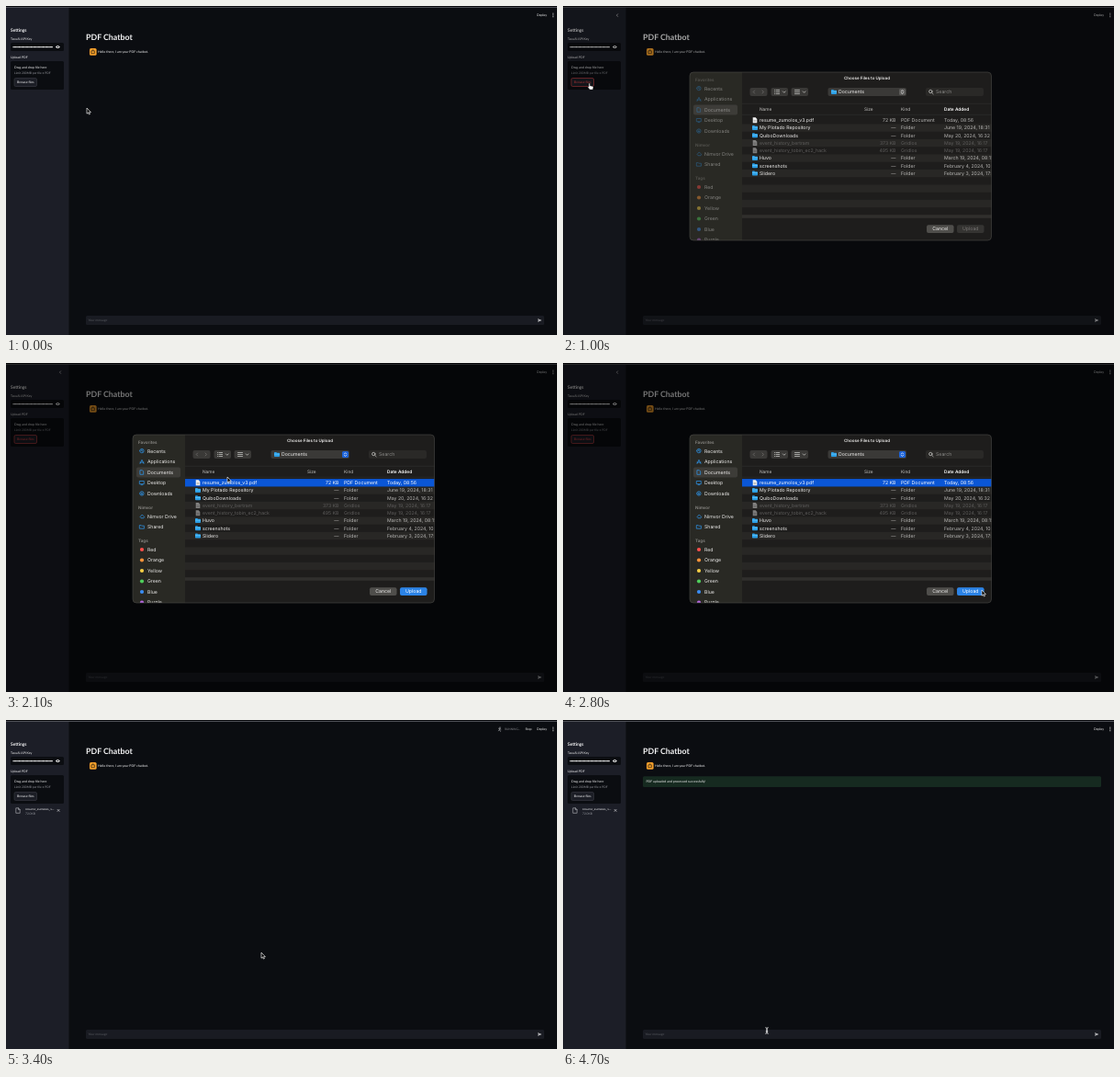
Write an HTML page that moves like this. It is 600 px wide and 358 px high and loops after 5 s.

```html
<!DOCTYPE html>
<html lang="en">
<head>
<meta charset="utf-8">
<title>PDF Chatbot</title>
<style>
html, body { margin: 0; width: 100%; height: 100%; overflow: hidden; background: #0b0d11; }
svg { display: block; width: 600px; height: 358px; }
text { fill: #f4f4f5; font: 3.5px Lato, sans-serif; text-rendering: geometricPrecision; white-space: pre; }
.b { font-weight: 700; }
.line { fill: none; stroke-width: .7; stroke-linecap: round; stroke-linejoin: round; }
#browse rect { fill: #1c1e26; stroke: #3b3d45; stroke-width: .6; }
#browse.hover rect { stroke: #e0474b; }
#browse.hover text { fill: #f0484d; }
#browse.press rect { fill: #4a343b; }
#browse.press text { fill: #a8434a; }
#dialog text { font: 5.2px Inter, sans-serif; fill: #f0efee; }
#dialog .head { font-size: 4.6px; fill: #8b8a86; font-weight: 600; }
#dialog .title { font-size: 4.5px; font-weight: 600; }
#dialog .col { font-size: 4.8px; fill: #c4c3c1; }
#dialog .sub { fill: #b9b8b6; }
#dialog .off text { fill: #5e5d5c; }
#dialog .off .icon { opacity: .45; }
#dialog .date { font-size: 5.2px; }
#pick, #go { visibility: hidden; }
.ready #pick, .ready #go { visibility: visible; }
.ready .row0 text { fill: #fff !important; }
#side { opacity: .45; }
.ready #side { opacity: 1; }
.btn { fill: #3a3937; }
#step { fill: #5b5a58; }
.ready #step { fill: #1d63d8; }
#dialog #upText { fill: #777573; }
#dialog.ready #upText { fill: #fff; }
</style>
</head>
<body>
<svg viewBox="0 0 600 358">
  <defs>
    <clipPath id="frame"><rect x="138" y="78" width="328.5" height="183" rx="4"/></clipPath>
    <clipPath id="cut"><rect x="18" y="96.3" width="40" height="5"/></clipPath>
    <g id="folder"><path fill="#2c9fe6" d="M0 .8q0-.8.8-.8h1.5l.8.8h2.1q.8 0 .8.8v2.6q0 .8-.8.8H.8q-.8 0-.8-.8z"/><path fill="#63c4f7" d="M0 1.7h6v.7H0z"/></g>
    <g id="sheet"><path fill="#f2f2f2" d="M0 0h3l1.6 1.6V6H0z"/><path stroke="#777" stroke-width=".5" d="M1 3h2.6M1 4.4h2.6"/></g>
  </defs>

  <rect width="600" height="358" fill="#0b0d11"/>
  <rect width="68.5" height="358" fill="#1c1e27"/>
  <rect width="600" height="1" fill="#08090c"/>
  <rect y="1" width="600" height=".9" fill="#55575d"/>

  <path id="fold" class="line" stroke="#d0d0d3" d="M59.6 8.8l-1.2 1.3 1.2 1.3"/>
  <text class="b" x="5" y="28.4" style="font-size:4.9px">Settings</text>
  <text x="5" y="37.4">TavuAI API Key</text>
  <rect x="5" y="40" width="58" height="9" rx="1.5" fill="#0b0d11"/>
  <path d="M7.5 44.6H51" stroke="#f0f0f0" stroke-width="1.1" stroke-dasharray="1.1 .2"/>
  <path d="M53.9 44.5q2.5-3.2 5 0q-2.5 3.2-5 0z" fill="#f0f0f0"/>
  <circle cx="56.4" cy="44.5" r=".8" fill="#0b0d11"/>
  <text x="5" y="57.3">Upload PDF</text>
  <rect x="5" y="60" width="58" height="31" rx="1.5" fill="#0b0d11"/>
  <text x="9" y="67.6">Drag and drop file here</text>
  <text x="9" y="73.5" style="font-size:3.3px;fill:#94969d">Limit 200MB per file • PDF</text>
  <g id="browse"><rect x="9" y="78.5" width="24.5" height="9" rx="1.5"/><text x="12" y="84.2">Browse files</text></g>
  <g id="file">
    <path class="line" stroke="#b9bac0" style="stroke-width:.6" d="M11.2 95.8h2.4l1.6 1.7v3.8h-4zM13.5 95.9v1.7h1.6"/>
    <text x="21" y="98.4" clip-path="url(#cut)">resume_zumolos_v…</text>
    <text x="21" y="102.9" style="font-size:3.3px;fill:#94969d">72.0KB</text>
    <path class="line" stroke="#d0d0d3" d="M56.1 97.4l2 2m0-2l-2 2"/>
  </g>

  <g id="run">
    <circle cx="538" cy="8.1" r=".7" fill="#a4a5aa"/>
    <path id="legs" class="line" stroke="#a4a5aa"/>
    <text x="543" y="11.2" style="font-size:3.2px;fill:#85868c">RUNNING...</text>
    <text x="565.5" y="11.3">Stop</text>
  </g>
  <text x="578" y="11.3">Deploy</text>
  <path d="M595.8 8.1v4" stroke="#f0f0f0" stroke-width="1" stroke-dasharray=".1 1.7" stroke-linecap="round"/>
  <text class="b" x="87" y="37.2" style="font-size:8.8px">PDF Chatbot</text>
  <rect x="91" y="46" width="7.6" height="7.8" rx="1.6" fill="#f5a02c"/>
  <path class="line" stroke="#3c2a12" d="M93.2 48.8h3.2v2.8h-3.2zM94.8 47.5v1.2"/>
  <text x="100" y="51.2" style="font-size:3.55px">Hello there, I am your PDF chatbot.</text>
  <g id="done">
    <rect x="87" y="61.3" width="499" height="11.6" rx="1.5" fill="#162a20"/>
    <text x="90.5" y="68.4" fill="#dff5e6">PDF uploaded and processed successfully!</text>
  </g>
  <rect x="87" y="337" width="499" height="10" rx="1.5" fill="#191b22"/>
  <text x="89.5" y="343.2" style="fill:#55575d">Your message</text>
  <path d="M579.2 340.2l4.2 1.8-4.2 1.8v-1.4l2-.4-2-.4z" fill="#c9cacd"/>

  <rect id="dim" width="600" height="358"/>

  <g id="dialog">
    <g clip-path="url(#frame)">
      <rect x="138" y="78" width="329" height="183" fill="#1e1d1c"/>
      <rect x="138" y="78" width="57" height="183" fill="#292924"/>
      <g id="stripes"></g>
      <path d="M195 112.3h272M195 124.3h272" stroke="#353432" stroke-width=".5"/>
      <path d="M195 235h272" stroke="#302f2d" stroke-width="3.4"/>
      <rect id="pick" x="195" y="126.1" width="272" height="8.4" fill="#0a56d6"/>
      <rect x="142" y="113.5" width="48" height="11" rx="2" fill="#3d3c38"/>
      <g id="side"></g>
      <text class="title" x="331" y="85.6" text-anchor="middle">Choose Files to Upload</text>
      <g class="btn">
        <rect x="203.5" y="95" width="19" height="9" rx="2"/><rect x="226.5" y="95" width="18.5" height="9" rx="2"/>
        <rect x="248.5" y="95" width="18.5" height="9" rx="2"/><rect x="288.5" y="95" width="85.5" height="9" rx="2"/>
        <rect x="395" y="95" width="63" height="9" rx="2" fill="#2a2927"/>
      </g>
      <path class="line" stroke="#777573" d="M208.6 98l-1.4 1.5 1.4 1.5M217 98l1.4 1.5-1.4 1.5"/>
      <path class="line" stroke="#d5d4d2" d="M230.5 97.5h.3m1.4 0h3.4M230.5 99.5h.3m1.4 0h3.4M230.5 101.5h.3m1.4 0h3.4M239.4 98.9l1.4 1.4 1.4-1.4M261.2 98.9l1.4 1.4 1.4-1.4M252.5 97.5h5M252.5 99.5h5M252.5 101.5h5"/>
      <rect id="step" x="366" y="96" width="7" height="7" rx="1.5"/>
      <path class="line" stroke="#fff" d="M368.3 98.9l1.2-1.2 1.2 1.2M368.3 100.2l1.2 1.2 1.2-1.2"/>
      <use href="#folder" x="292" y="97"/>
      <text x="300" y="101.4">Documents</text>
      <circle class="line" cx="400.3" cy="99" r="1.7" stroke="#d5d4d2"/><path class="line" stroke="#d5d4d2" d="M401.6 100.3l1.5 1.5"/>
      <text x="406" y="101.4" style="fill:#8b8a88">Search</text>
      <text class="col" x="214" y="119.8">Name</text><text class="col" x="328" y="119.8">Size</text>
      <text class="col" x="368" y="119.8">Kind</text><text class="col" x="415" y="119.8" style="fill:#fff;font-weight:600">Date Added</text>
      <g id="rows"></g>
      <rect x="396" y="244.3" width="29.5" height="8.6" rx="2" fill="#4f4e4b"/>
      <text x="410.7" y="250.4" text-anchor="middle">Cancel</text>
      <rect x="429" y="244.3" width="29.5" height="8.6" rx="2" fill="#353432"/>
      <rect id="go" x="429" y="244.3" width="29.5" height="8.6" rx="2" fill="#2b83e6"/>
      <text id="upText" x="443.7" y="250.4" text-anchor="middle">Upload</text>
    </g>
    <rect x="138" y="78" width="328.5" height="183" rx="4" fill="none" stroke="#4b4a47" stroke-width=".6"/>
  </g>

  <g id="cursor">
    <path id="arrow" fill="#000" stroke="#fff" stroke-width=".65" d="M0 0V6.2L1.5 4.9 2.4 7 3.4 6.6 2.5 4.6H4.4Z"/>
    <path id="hand" fill="#fff" stroke="#111" stroke-width=".4" d="M-.9.5q.7-.8 1.3 0v2.3l3 .6q.7.2.6 1L3.5 7H.2L-1.9 4.4q0-.9 1 -.3z"/>
    <path id="beam" class="line" stroke="#fff" d="M-1.3-3.3q1.3 0 1.3.8v5q0 .8-1.3.8M1.3-3.3q-1.3 0-1.3.8v5q0 .8 1.3.8M-.8.9h1.6"/>
  </g>
</svg>
<script>
const $ = id => document.getElementById(id);
const text = (x, y, s, cls = "") => `<text class="${cls}" x="${x}" y="${y}">${s}</text>`;

const icons = [
  "M2.2-.4v-1.2M2.2-.4l1 .6M0-.4a2.2 2.2 0 1 0 4.4 0a2.2 2.2 0 1 0-4.4 0",
  "M.3 2L2.3-2.2 4.3 2M.2.6h4.2",
  "M.6-2.3h2.1L4-1v3.3H.6z",
  "M0-2h4.6v3.2H0zM1.4 2.1h1.8",
  "M0 0a2.2 2.2 0 1 0 4.4 0a2.2 2.2 0 1 0-4.4 0M2.2-1.2v2.2M1.3.2l.9.9.9-.9",
  "M1 1.5q-1.5-1.2.2-2.2q1.2-2 2.7 0q2 .8.6 2.2z",
  "M0-1.6h1.5l.6.6h2.6v3H0z"
];
const places = [["Recents", 96], ["Applications", 107.5], ["Documents", 119], ["Desktop", 130.5],
  ["Downloads", 142], ["Nimvor Drive", 167], ["Shared", 178.2]];
const tags = [["Red", "#fb4f4b"], ["Orange", "#f7923a"], ["Yellow", "#f7cf45"],
  ["Green", "#4fcf5c"], ["Blue", "#3a8df5"], ["Purple", "#b565e0"]];
$("side").innerHTML =
  [["Favorites", 88.2], ["Nimvor", 159.1], ["Tags", 195.2]].map(([s, y]) => text(144, y, s, "head")).join("") +
  places.map(([s, y], i) => `<path class="line" stroke="#2f9bf4" transform="translate(145.7 ${y})" d="${icons[i]}"/>` +
    text(154, y + 1.9, s)).join("") +
  tags.map(([s, c], i) => `<circle cx="148" cy="${203 + i * 11.5}" r="2.1" fill="${c}"/>` +
    text(154, 204.9 + i * 11.5, s)).join("");

const files = [
  ["resume_zumolos_v3.pdf", "72 KB", "PDF Document", "Today, 08:56"],
  ["My Plotado Repository", "--", "Folder", "June 19, 2024, 18:31"],
  ["QuiboDownloads", "--", "Folder", "May 20, 2024, 16:32"],
  ["event_history_bertram", "373 KB", "Gridlos", "May 19, 2024, 16:17"],
  ["event_history_tobin_ec2_hack", "495 KB", "Gridlos", "May 19, 2024, 16:17"],
  ["Huvo", "--", "Folder", "March 19, 2024, 08:15"],
  ["screenshots", "--", "Folder", "February 4, 2024, 10:20"],
  ["Slidero", "--", "Folder", "February 3, 2024, 17:41"]
];
const pitch = 8.25;
$("rows").innerHTML = files.map(([name, size, kind, date], i) => {
  const y = 130.3 + i * pitch, folder = kind == "Folder";
  return `<g class="row${i} ${kind == "Gridlos" ? "off" : ""}">
    <use class="icon" href="#${folder ? "folder" : "sheet"}" x="${folder ? 206 : 206.7}" y="${y - (folder ? 2.5 : 3)}"/>` +
    text(214, y + 1.9, name) +
    `<text class="sub" x="362.5" y="${y + 1.9}" text-anchor="end">${size.replace("--", "—")}</text>` +
    text(368, y + 1.9, kind, "sub") + text(415, y + 1.9, date, "sub date") + "</g>";
}).join("");
$("stripes").innerHTML = [1, 3, 5, 7, 9, 11].map(i =>
  `<rect x="195" y="${126.2 + i * pitch}" width="272" height="${pitch}" fill="#282725"/>`).join("");

// Pointer stops: time, x, y
const stops = [[0, 88, 111], [600, 29, 84], [1000, 29, 84], [1200, 124, 94], [1300, 239.5, 122],
  [1500, 239.5, 122], [1600, 241, 124], [2100, 241, 124], [2500, 478, 255], [2800, 456, 247],
  [2900, 456, 247], [3400, 278, 253], [3700, 222, 338], [5000, 222, 338]];

const ramp = (t, a, b) => {
  const p = Math.min(1, Math.max(0, (t - a) / (b - a)));
  return p * p * (3 - 2 * p);
};
const show = (id, on) => $(id).style.display = on ? "" : "none";

function pointer(t) {
  const i = stops.findIndex(s => s[0] > t);
  const [t0, x0, y0] = stops[i - 1], [t1, x1, y1] = stops[i];
  const p = ramp(t, t0, t1);
  return [x0 + (x1 - x0) * p, y0 + (y1 - y0) * p];
}

function draw(now) {
  const t = Math.floor(now % 5000 / 100) * 100;
  const [x, y] = pointer(t);
  const hand = t >= 600 && t <= 1000, beam = t >= 3700;
  $("cursor").setAttribute("transform", `translate(${x} ${y})`);
  show("hand", hand);
  show("beam", beam);
  show("arrow", !hand && !beam);

  show("fold", t >= 400 && t < 3100);
  $("browse").classList.toggle("hover", t >= 600 && t < 3100);
  $("browse").classList.toggle("press", t >= 700 && t < 900);

  const gone = ramp(t, 2900, 3200);
  $("dim").setAttribute("opacity", .52 * ramp(t, 800, 1150) * (1 - gone));
  show("dialog", t >= 900 && t < 3200);
  $("dialog").setAttribute("opacity", ramp(t, 800, 1000) * (1 - gone));
  $("dialog").setAttribute("transform", `translate(0 ${-12 * (1 - ramp(t, 800, 1200))})`);
  $("dialog").classList.toggle("ready", t >= 1900);

  show("file", t >= 3300);
  show("run", t >= 3300 && t < 4200);
  $("legs").setAttribute("d", t / 100 % 2
    ? "M537.8 9.1v1.5l-.9 1.7M537.8 10.6l1.1 1.6M536.6 9.9l1.2-.7 1.3.8"
    : "M537.8 9.1l-.3 1.5.9 1.7M537.5 10.6l-1.3 1M536.4 9.2l1.4.1 1.1.9");
  show("done", t >= 4100);
  requestAnimationFrame(draw);
}
draw(0);
</script>
</body>
</html>
```
